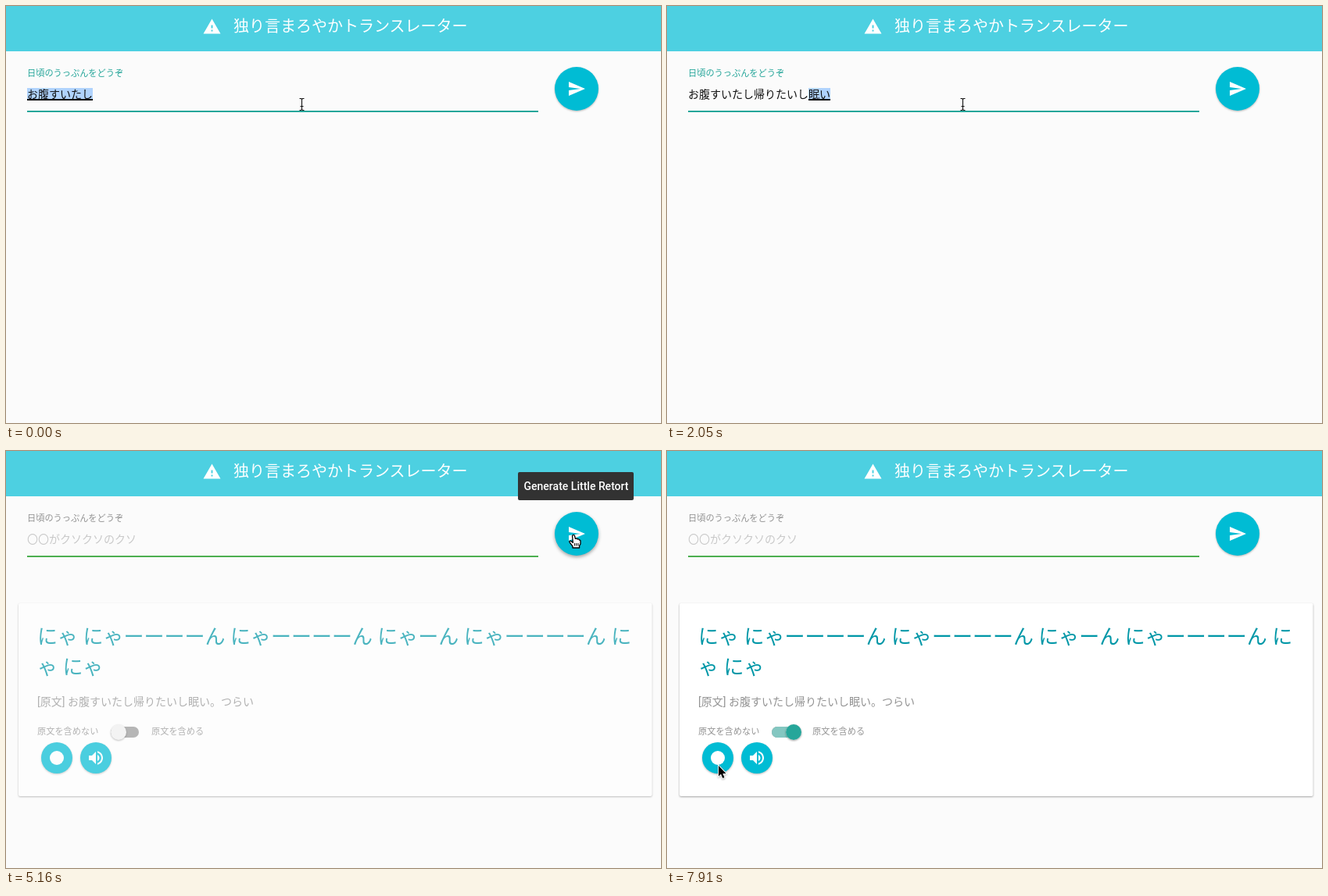
Animation of 838x534 px, one loop 8 s. Source, as an HTML page:

```html
<!DOCTYPE html>
<html lang="ja">
<head>
<meta charset="utf-8">
<title>独り言まろやかトランスレーター</title>
<style>
  html, body { margin: 0; width: 100%; height: 100%; overflow: hidden; background: #fbfbfb; }
  svg { display: block; width: 838px; height: 534px; }
  text { font: 14px Roboto, "Noto Sans CJK JP", sans-serif; white-space: pre; }
  .fab { fill: #00bcd4; filter: drop-shadow(0 1px 1px rgba(0,0,0,.28)); }
  .fab.hover { filter: drop-shadow(0 2px 2px rgba(0,0,0,.36)); }
  .grey { fill: #939393; }
  text.small { font-size: 11.2px; }
  #popup text { font-size: 13px; }
  #tip text { font-weight: 500; }
  #card .title { font-size: 26px; fill: #0097a7; }
  .panel { fill: #fff; filter: drop-shadow(0 1px 1px rgba(0,0,0,.35)); }
</style>
</head>
<body>
<svg viewBox="0 0 838 534">
  <rect width="838" height="534" fill="#fbfbfb"/>
  <rect width="838" height="58" fill="#4dd0e1"/>
  <path transform="translate(251.5 14.5)" fill="#fff" d="M1 21h22L12 2 1 21zm12-3h-2v-2h2v2zm0-4h-2v-4h2v4z"/>
  <text x="291" y="32.6" fill="#fff" style="font-size:20px">独り言まろやかトランスレーター</text>

  <text id="label" class="small" x="27" y="89.7">日頃のうっぷんをどうぞ</text>
  <rect id="mark" y="105" height="16" fill="#b0d3fd"/>
  <text id="input" x="27" y="118"></text>
  <rect id="under"/>
  <rect id="caret" y="105" width="1" height="16"/>
  <rect id="line" x="27" y="134" width="654" height="2"/>

  <circle id="send" class="fab" cx="730" cy="106" r="28"/>
  <path transform="translate(718 94)" fill="#fff" d="M2.01 21L23 12 2.01 3 2 10l15 2-15 2z"/>

  <g id="card">
    <rect class="panel" x="16" y="195" width="810.5" height="247" rx="2"/>
    <text class="title" x="40" y="246.5">にゃ にゃーーーーん にゃーーーーん にゃーん にゃーーーーん に</text>
    <text class="title" x="40" y="285.5">ゃ にゃ</text>
    <text class="grey" x="40" y="325.5">[原文] お腹すいたし帰りたいし眠い。つらい</text>
    <text class="grey small" x="40" y="362.5">原文を含めない</text>
    <text class="grey small" x="186" y="362.5">原文を含める</text>
    <rect x="134" y="353" width="36" height="14" rx="7" fill="#999"/>
    <rect class="on" x="134" y="353" width="36" height="14" rx="7" fill="#84c7c1"/>
    <g id="thumb" style="filter:drop-shadow(0 1px 1px rgba(0,0,0,.35))">
      <circle cx="144" cy="360" r="10" fill="#f1f1f1"/>
      <circle class="on" cx="144" cy="360" r="10" fill="#26a69a"/>
    </g>
    <circle class="fab" cx="65" cy="393" r="20"/>
    <circle cx="65" cy="393" r="9" fill="#fff"/>
    <circle class="fab" cx="115" cy="393" r="20"/>
    <path transform="translate(103 381)" fill="#fff" d="M3 9v6h4l5 5V4L7 9H3zm13.5 3c0-1.77-1.02-3.29-2.5-4.03v8.05c1.48-.73 2.5-2.25 2.5-4.02zM14 3.23v2.06c2.89.86 5 3.54 5 6.71s-2.11 5.85-5 6.71v2.06c4.01-.91 7-4.49 7-8.77s-2.99-7.86-7-8.77z"/>
  </g>

  <g id="popup"></g>

  <g id="tip">
    <rect x="655" y="27" width="148" height="36" rx="2" fill="#323232"/>
    <text x="729.5" y="50" fill="#fff" text-anchor="middle">Generate Little Retort</text>
  </g>

  <g id="mouse">
    <path id="beam" d="M-3 -7.5h2l1 1 1-1h2M0 -6.5v13M-3 7.5h2l1-1 1 1h2M-2 2.5h4" fill="none" stroke="#111" stroke-width="1.1"/>
    <path id="arrow" d="M0 0v13.5l3-2.8 2.3 5.3 2.2-1-2.2-5.1h4.2z" stroke="#fff" stroke-width="1.8" paint-order="stroke" style="filter:drop-shadow(0 1px 1px rgba(0,0,0,.3))"/>
    <g id="hand" stroke="#000" stroke-linejoin="round">
      <path d="M-1.5 1.5Q0 -.8 1.5 1.5L2.4 5.4Q4 4 5 6Q6.6 5 7.4 7Q9 6.6 9 8.6V12L7.6 14.4V17H-1V15L-5 9.8Q-5.6 7.6-3.4 8.2L-.6 10.4z" fill="#fff" stroke-width="1.3"/>
      <path d="M1.6 11v3.5M3.8 11v3.5M6 11v3.5" stroke-width="1"/>
    </g>
  </g>
</svg>
<script>
const LOOP = 8000, CHAR = 14, LEFT = 27;
const $ = id => document.getElementById(id);
const set = (el, attrs) => { for (const k in attrs) el.setAttribute(k, attrs[k]); };
const show = (el, on) => { el.style.visibility = on ? 'visible' : 'hidden'; };
const ramp = (t, a, b) => Math.min(1, Math.max(0, (t - a) / (b - a)));

const A = 'お腹すいたし', B = A + '帰りたいし', C = B + '眠い', D = C + '。';
const next = ['もうすぐお昼ですね', '眠いし'];
const home = ['帰りたい気持ちが', '帰りたい', '帰り'];
const sleepy = ['眠い時に飲むお茶', '眠い', '眠く'];
const hard = ['つらい夏休みだった', '辛い社会', 'つらいことが'];

// time, committed text, text being composed, candidates, converted?
const steps = [
  [0, '', A, 0, 1], [180, A, '', next], [300, A, ''],
  [470, A, 'ｋ'], [550, A, 'か', home], [630, A, 'かえ', home], [710, A, 'かえｒ', home],
  [790, A, 'かえり', home], [870, A, 'かえりｔ', home], [950, A, 'かえりた', home],
  [1040, A, 'かえりたい', home], [1120, A, 'かえりたいｓ', home],
  [1200, A, '帰りたいし', 0, 1], [1260, B, ''], [1350, B, '', next], [1440, B, ''],
  [1580, B, 'ｎ'], [1660, B, 'ね', sleepy], [1740, B, 'ねｍ', sleepy], [1820, B, 'ねむ', sleepy],
  [1900, B, 'ねむい', sleepy], [1970, B, 'ねむい'], [2050, B, '眠い', 0, 1], [2590, C, ''],
  [3070, C, '。', ['。', '、', '・']], [3160, D, 'ｔ'], [3250, D, 'つ', hard], [3340, D, 'つｒ', hard],
  [3430, D, 'つら', hard], [3530, D, 'つらい', hard], [3640, D, 'つらい'], [3730, D + 'つらい', ''],
  [4920, '', '']
];

const easeIn = p => p * p, easeOut = p => p * (2 - p), easeBoth = p => p * p * (3 - 2 * p);
// start, end, from, to, easing
const moves = [
  [3900, 4430, [378.5, 126], [726, 107], easeBoth],
  [5350, 5780, [726, 107], [602, 352], easeIn],
  [5780, 6680, [602, 352], [154, 367], easeOut],
  [7340, 7910, [154, 367], [66, 403], easeBoth]
];

function drawPopup(x, list) {
  if (!list) return '';
  const w = Math.max(88, ...list.map(s => s.length * 13)) + 10;
  const sep = 122.5 + list.length * 18;
  const rows = list.map((s, i) => `<text x="${x + 3.5}" y="${137 + i * 18}">${s}</text>`).join('');
  return `<rect x="${x - 5.5}" y="${sep - 10}" width="${w + 12}" height="40.5" rx="10" fill="#e6e6e6"/>
    <rect x="${x + .5}" y="121.5" width="${w}" height="${sep - 102}" fill="#fff" stroke="#999"
      style="filter:drop-shadow(0 2px 3px rgba(0,0,0,.25))"/>${rows}
    <path d="M${x + 1} ${sep}h${w - 1}" stroke="#8c1a1a"/>
    <text x="${x + 5}" y="${sep + 15.5}">Tabキーで選択</text>`;
}

let shown = null;
function drawInput(step) {
  const [, done, comp, list, hot] = step;
  const x = LEFT + done.length * CHAR, w = comp.length * CHAR;
  const empty = !done && !comp;
  $('input').textContent = empty ? '〇〇がクソクソのクソ' : done + comp;
  set($('input'), { fill: empty ? '#c9c9c9' : '#111' });
  set($('mark'), { x, width: hot ? w : 0 });
  set($('under'), { x, width: w, y: hot ? 119 : 120, height: hot ? 2 : 1 });
  set($('caret'), { x: x + w - .5 });
  set($('label'), { fill: empty ? '#939393' : '#26a69a' });
  set($('line'), { fill: empty ? '#4caf50' : '#26a69a' });
  $('popup').innerHTML = drawPopup(x - 5, list);
}

function mouseAt(t) {
  let pos = moves[0][2];
  for (const [a, b, from, to, ease] of moves) {
    if (t < a) break;
    const p = ease(ramp(t, a, b));
    pos = from.map((v, i) => v + (to[i] - v) * p);
  }
  return pos;
}

function cursorFor(x, y) {
  if (Math.hypot(x - 730, y - 106) < 28) return 'hand';
  if (x < 684 && y > 90 && y < 137) return 'beam';
  if (x > 40 && x < 253 && y > 345 && y < 375) return 'hand';
  return 'arrow';
}

function draw(t) {
  const step = steps.findLast(s => s[0] <= t);
  if (step !== shown) drawInput(shown = step);
  show($('caret'), !step[4] && t < 4920 && !(t >= 4230 && t < 4730));

  const [x, y] = mouseAt(t), kind = cursorFor(x, y);
  set($('mouse'), { transform: `translate(${x} ${y})` });
  for (const id of ['beam', 'arrow', 'hand']) show($(id), id === kind);
  $('send').classList.toggle('hover', t > 4300 && t < 5600);

  const tip = easeOut(ramp(t, 4430, 4730)) * (1 - ramp(t, 5930, 6170));
  set($('tip'), { opacity: tip, transform: `translate(0 ${10 * (1 - tip)})` });
  set($('card'), { opacity: ramp(t, 4880, 5280) });

  const on = ramp(t, 7010, 7180);
  set($('thumb'), { transform: `translate(${18 * on} 0)` });
  document.querySelectorAll('.on').forEach(el => set(el, { opacity: on }));
}

const start = performance.now();
function tick(now) {
  draw(Math.max(0, now - start) % LOOP);
  requestAnimationFrame(tick);
}
draw(0);
requestAnimationFrame(tick);
</script>
</body>
</html>
```
